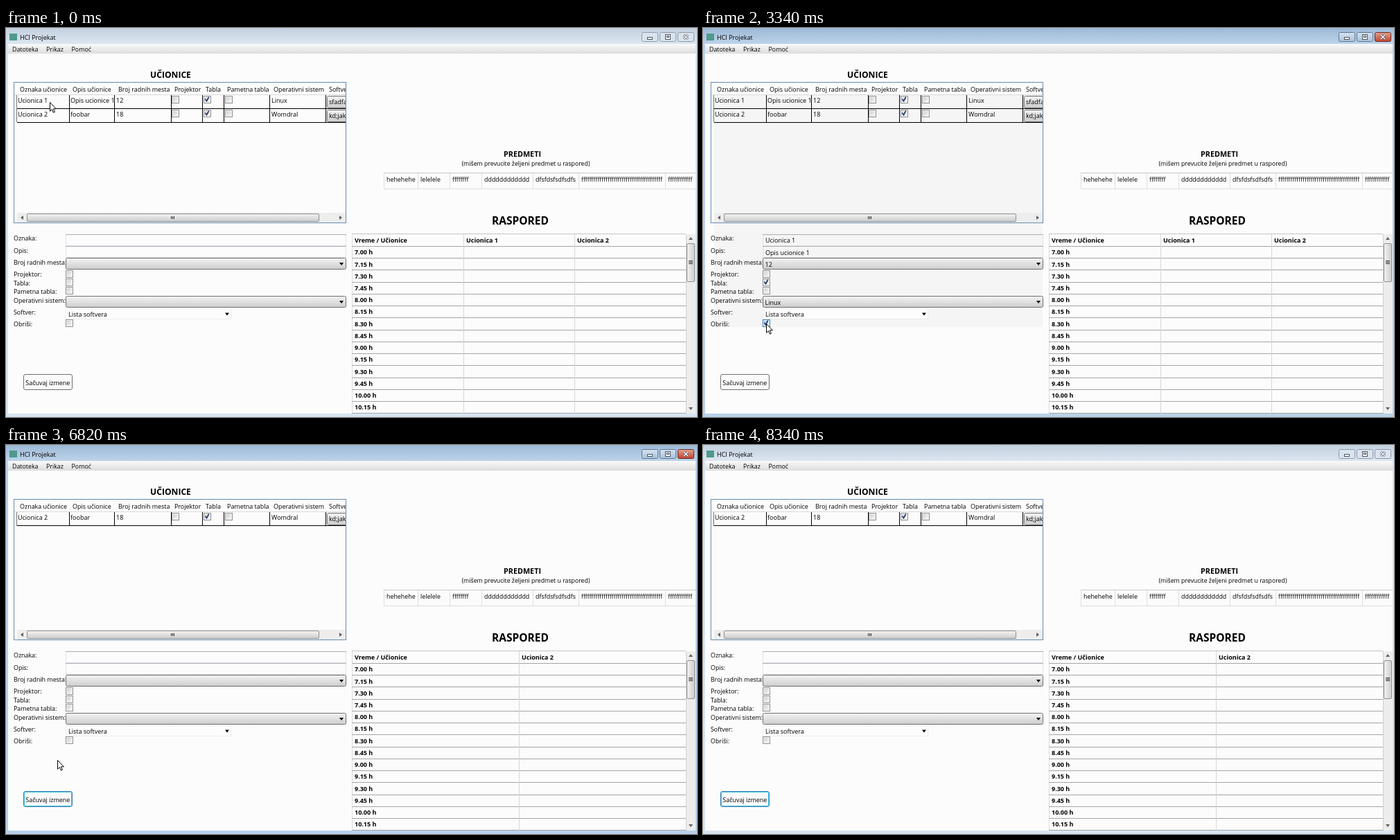
These frames come from a looping animation (997x562 px, 8440 ms). An HTML page:

```html
<!DOCTYPE html>
<html lang="sr-Latn">
<head>
<meta charset="utf-8">
<title>HCI Projekat</title>
<style>
html, body { margin: 0; width: 100%; height: 100%; overflow: hidden; background: #fcfcfc; }
svg { display: block; width: 997px; height: 562px; }
text { font-family: "Open Sans", "Noto Sans", sans-serif; font-variant-ligatures: none; white-space: pre; }
rect, line { shape-rendering: crispEdges; }
.round { shape-rendering: auto; }
</style>
</head>
<body>
<svg id="stage" viewBox="0 0 997 562" xmlns="http://www.w3.org/2000/svg"></svg>
<script>
const LOOP = 8440;
const ACTIVATE = 120, PRESS_CHECK = 2420, CHECKED = 2510, PRESS_SAVE = 4710, SAVED = 5380, DEACTIVATE = 8340;

// Drawing helpers
const box = (x, y, w, h, fill) => `<rect x="${x}" y="${y}" width="${w}" height="${h}" fill="${fill}"/>`;
const frame = (x, y, w, h, stroke, fill = 'none', r = 0, width = 1) =>
  `<rect ${r ? 'class="round"' : ''} x="${x + .5}" y="${y + .5}" width="${w - 1}" height="${h - 1}" rx="${r}" fill="${fill}" stroke="${stroke}" stroke-width="${width}"/>`;
const hline = (x1, x2, y, color) => box(x1, Math.round(y), x2 - x1, 1, color);
const vline = (x, y1, y2, color) => box(x, y1, 1, y2 - y1, color);
const label = (x, y, str, { size = 9, fill = '#000', bold = false, mid = false } = {}) =>
  `<text x="${x}" y="${y}" font-size="${size}" fill="${fill}"${bold ? ' font-weight="700"' : ''}${mid ? ' text-anchor="middle"' : ''}>${str}</text>`;
const path = (d, fill = '#000', extra = '') => `<path d="${d}" fill="${fill}" ${extra}/>`;
const during = (from, to, body) => `<g data-from="${from}" data-to="${to}">${body}</g>`;
const gradient = (id, a, b, x2 = 0, y2 = 1) =>
  `<linearGradient id="${id}" x1="0" y1="0" x2="${x2}" y2="${y2}"><stop stop-color="${a}"/><stop offset="1" stop-color="${b}"/></linearGradient>`;
const tick = (x, y) =>
  path(`M${x + 2.3} ${y + 4.6}l2.2 3 3.2-6`, 'none', 'stroke="#1d2b60" stroke-width="1.6"');
const checkbox = (x, y, on, hot) =>
  frame(x, y, 11, 11, hot ? '#3c7fb1' : '#8e8f8f', '#f4f4f4') +
  box(x + 2, y + 2, 7, 7, hot ? 'url(#hotCheck)' : 'url(#check)') + (on ? tick(x, y) : '');
const arrow = (x, y, dx, dy, color = '#000') => dx
  ? path(`M${x + 2 * dx} ${y}l${-4 * dx}-3v6z`, color)
  : path(`M${x} ${y + 2 * dy}l-3 ${-4 * dy}h6z`, color);

function titleBar(active) {
  const edge = active ? '#b9d1ea' : '#d7e4f2';
  const line = active ? '#61778f' : '#8d9aa8';
  const face = active ? 'url(#capOn)' : '#d9e4ef';
  const buttons = [917, 943, 969].map((x, i) =>
    frame(x, 6, 24, 14, active && i === 2 ? '#6b2a24' : line, active && i === 2 ? 'url(#capClose)' : face, 2)).join('');
  const glyph = 'stroke="#4a5560" stroke-width="1"';
  return box(0, 0, 997, 562, edge) + box(0, 0, 997, 23, active ? 'url(#barOn)' : 'url(#barOff)') +
    buttons + frame(925, 13, 8, 4, '#4a5560', '#fff') +
    frame(951, 9, 8, 8, '#4a5560', '#fff') + frame(953, 11, 4, 3, '#4a5560') +
    path('M978 10l6 6m0-6l-6 6', 'none', 'stroke="#4a5560" stroke-width="3"') +
    path('M978 10l6 6m0-6l-6 6', 'none', 'stroke="#fff" stroke-width="1.4"');
}

function tableRow(y, { name, about, seats, system, software }, selected) {
  const opt = { fill: selected ? '#fff' : '#000' };
  const columns = [92, 157, 239, 284, 315, 381, 462];
  return (selected ? box(16, y, 446, 19, '#3399ff') : '') +
    label(17, y + 11, name, opt) + label(93, y + 11, about, opt) +
    label(159, y + 11, seats, opt) + label(383, y + 11, system, opt) +
    columns.map(x => vline(x - 1, y, y + 20, '#000')).join('') + hline(16, 490, y + 19, '#000') +
    (selected ? frame(16, y, 76, 20, '#000') : '') +
    checkbox(239, y + 1, false) + checkbox(285, y + 1, true) + checkbox(316, y + 1, false) +
    frame(463, y + 1, 40, 18, '#707070', 'url(#face)', 2) + label(466, y + 13, software);
}

const combo = y => frame(86, y, 405, 17, '#707070', 'url(#face)', 2) + arrow(484, y + 9, 0, 1);

function schedule(rooms) {
  const width = 482 / (rooms.length + 1);
  let out = '';
  rooms.forEach((room, i) => {
    const x = Math.round(499 + width * (i + 1));
    out += vline(x, 298, 557, '#d3d6da') + label(x + 4, 310, room, { bold: true });
  });
  return out;
}

function scheduleRows() {
  let out = hline(499, 981, 297, '#c4c4c4') + vline(499, 298, 557, '#dcdcdc') + vline(981, 298, 557, '#cfcfcf') +
    label(503, 310, 'Vreme / Učionice', { bold: true });
  for (let i = 0; i < 14; i++) {
    const time = `${7 + (i >> 2)}.${String(i % 4 * 15).padStart(2, '0')} h`;
    out += hline(499, 981, 315 + i * 17.23, '#a5a5a5') +
      label(503, 327.3 + i * 17.23, time, { bold: true });
  }
  return out + hline(499, 981, 556, '#a5a5a5');
}

function subjects() {
  const cells = [[545, 'hehehehe'], [594, 'lelelele'], [640, 'f'.repeat(8)], [686, 'd'.repeat(12)],
    [760, 'dfsfdsfsdfsdfs'], [826, 'f'.repeat(40)], [951, 'f'.repeat(12)]];
  return hline(545, 995, 209, '#c8c8c8') + hline(545, 995, 232, '#dedede') +
    cells.map(([x, s]) => vline(x, 210, 233, '#dedede') +
      label(x + 4, 222, s, { size: s[0] === 'f' ? 8.65 : 8.9 })).join('');
}

function saveButton(border, fill, focused) {
  return frame(25, 500, 71, 23, border, fill, 2.5) +
    (focused ? frame(26, 501, 69, 21, '#45c3e8', 'none', 1.5) : '') +
    label(28.3, 515.5, 'Sačuvaj izmene', { size: 8.95 });
}

const roomOne = { name: 'Ucionica 1', about: 'Opis ucionice 1', seats: '12', system: 'Linux', software: 'sfadfa' };
const roomTwo = { name: 'Ucionica 2', about: 'foobar', seats: '18', system: 'Womdral', software: 'kd;jak' };

const headers = [[20, 'Oznaka učionice'], [96, 'Opis učionice'], [162, 'Broj radnih mesta'], [243, 'Projektor'],
  [288, 'Tabla'], [319, 'Pametna tabla'], [386, 'Operativni sistem'], [466, 'Softver']];
const fields = [[307, 'Oznaka:'], [325, 'Opis:'], [342, 'Broj radnih mesta:'], [359, 'Projektor:'], [372, 'Tabla:'],
  [384, 'Pametna tabla:'], [397, 'Operativni sistem:'], [414, 'Softver:'], [431, 'Obriši:']];

const defs = `<defs>
  ${gradient('barOn', '#9db9d6', '#bdd3ea')}${gradient('barOff', '#c3d0de', '#dce6f1')}
  ${gradient('capOn', '#d6e3f1', '#a9c1db')}${gradient('capClose', '#e5a193', '#c0432c')}
  ${gradient('menu', '#fafafa', '#dcdcdc')}${gradient('face', '#f3f3f3', '#cdcdcd')}
  ${gradient('thumbV', '#f3f3f3', '#cdcdcd', 1, 0)}
  ${gradient('check', '#cbcfd5', '#f7f7f7', 1, 1)}${gradient('hotCheck', '#8ecbf0', '#e6f5fd', 1, 1)}
  ${gradient('hot', '#e8f5fc', '#a8daf4')}${gradient('pressed', '#d5edf9', '#8dcbea')}
  <clipPath id="gridClip"><rect x="12" y="79" width="478.5" height="202"/></clipPath></defs>`;

const windowFrame =
  titleBar(false) + during(ACTIVATE, DEACTIVATE, titleBar(true)) +
  box(5, 8, 11, 10, '#4f9a8c') + label(20, 16.5, 'HCI Projekat') +
  box(3, 23, 992, 534, '#fcfcfc') + box(3, 23, 992, 14, 'url(#menu)') +
  label(9, 33.5, 'Datoteka', { size: 8.85 }) + label(58, 33.5, 'Prikaz', { size: 8.85 }) + label(94.5, 33.5, 'Pomoć', { size: 8.85 });

const shades =
  during(1600, PRESS_CHECK, box(64, 137, 12, 43, '#f0f0f0')) +
  during(1770, PRESS_CHECK, box(67, 180, 9, 56, '#f0f0f0')) +
  during(1910, PRESS_CHECK, box(70, 236, 12, 31, '#f0f0f0')) +
  during(PRESS_CHECK, SAVED, box(16, 97, 474, 335, '#f5f5f5')) +
  during(3440, SAVED, box(75, 422, 28, 10, '#fefefe')) +
  during(6970, DEACTIVATE, box(86, 250, 404, 17, '#f0f0f0')) +
  during(7020, DEACTIVATE, box(143, 222, 39, 28, '#f0f0f0'));

const rooms =
  label(237.5, 72.3, 'UČIONICE', { size: 12.1, bold: true, mid: true }) +
  `<g clip-path="url(#gridClip)">` +
  headers.map(([x, s]) => label(x, 92, s, { size: 8.95 })).join('') +
  hline(12, 490, 96, '#d9d9d9') + vline(15, 97, 136, '#777') +
  during(0, ACTIVATE, tableRow(97, roomOne)) +
  during(ACTIVATE, PRESS_CHECK, tableRow(97, roomOne, true)) +
  during(PRESS_CHECK, SAVED, tableRow(97, roomOne)) +
  during(0, SAVED, tableRow(117, roomTwo)) +
  during(SAVED, LOOP, box(15, 117, 1, 20, '#fcfcfc') + tableRow(97, roomTwo)) +
  box(16, 267, 475, 14, '#ededed') + frame(30, 268, 422, 12, '#8f8f8f', 'url(#face)', 1.5) +
  [238, 240, 242].map(x => vline(x, 272, 276, '#333')).join('') +
  arrow(23, 274, -1, 0, '#606060') + arrow(483, 274, 1, 0, '#606060') + '</g>' +
  frame(11, 78, 480, 204, '#688caf');

const form =
  fields.map(([y, s]) => label(11, y, s, { size: 8.9 })).join('') +
  [298, 315].map(y => frame(86, y, 405, 17, '#e2e3ea') + hline(86, 491, y, '#abadb3')).join('') +
  hline(86, 491, 331, '#d5d7dd') + combo(332) + combo(387) +
  frame(86, 405, 239, 16, '#ececec', '#fdfdfd') + label(90, 416.5, 'Lista softvera') + arrow(319, 413.5, 0, 1) +
  [350, 362, 374, 421].map(y => checkbox(86, y)).join('') +
  during(ACTIVATE, SAVED,
    label(90, 310, roomOne.name) + label(90, 327.5, roomOne.about) + label(89.5, 344.5, roomOne.seats) +
    label(89.5, 399.5, roomOne.system) + tick(86, 362)) +
  during(2270, 3440, checkbox(86, 421, false, true)) +
  during(CHECKED, SAVED, tick(86, 421)) +
  during(0, 3660, saveButton('#707070', '#fafafa')) +
  during(3660, PRESS_SAVE, saveButton('#3c7fb1', 'url(#hot)')) +
  during(PRESS_SAVE, SAVED, saveButton('#2c628b', 'url(#pressed)')) +
  during(SAVED, 6813, saveButton('#3c7fb1', 'url(#hot)', true)) +
  during(6813, LOOP, saveButton('#3c7fb1', '#fafafa', true));

const timetable =
  label(745, 186, 'PREDMETI', { size: 10.8, bold: true, mid: true }) +
  label(750, 198.5, '(mišem prevucite željeni predmet u raspored)', { size: 8.75, mid: true }) +
  subjects() +
  label(742, 283.5, 'RASPORED', { size: 15.5, bold: true, mid: true }) +
  scheduleRows() +
  during(0, SAVED, schedule([roomOne.name, roomTwo.name])) +
  during(SAVED, LOOP, schedule([roomTwo.name])) +
  box(982, 298, 13, 259, '#ededed') + frame(982, 311, 12, 56, '#8f8f8f', 'url(#thumbV)', 1.5) +
  [336, 338, 340].map(y => hline(985, 991, y, '#333')).join('') +
  arrow(988, 304, 0, -1, '#606060') + arrow(988, 550, 0, 1, '#606060');

const cursorShape = path('M.5 .5v12.7l2.9-2.7 2 4.7 2-.9-2-4.5h4z', '#fff', 'id="cursor" stroke="#000" stroke-width="1"');

const stage = document.getElementById('stage');
stage.innerHTML = defs + windowFrame + shades + rooms + form + timetable + cursorShape;

// Mouse moves advance in even steps through evenly timed points
const moves = [
  { start: 0, end: 0, steps: 1, points: [[63, 107]] },
  { start: 1490, end: 2330, steps: 16, points: [[64, 108], [65, 130], [67, 185], [71, 240], [79, 335], [88, 410], [91, 429]] },
  { start: 3340, end: 3770, steps: 10, points: [[91, 427], [90, 430], [85, 450], [73, 485], [61, 507], [57, 511]] },
  { start: 6760, end: 7560, steps: 16, points: [[60, 505], [95, 380], [173, 222], [320, 206], [540, 250], [740, 370], [850, 470]] },
  { start: 7620, end: 7620, steps: 1, points: [[856, 537]] }
];

function cursorAt(t) {
  const { start, end, steps, points } = moves.filter(m => t >= m.start).pop();
  if (t >= end) return points[points.length - 1];
  const step = Math.floor((t - start) / (end - start) * (steps - 1));
  const p = step / (steps - 1) * (points.length - 1), i = Math.floor(p);
  return points[i].map((v, k) => Math.round(v + (points[i + 1][k] - v) * (p - i)));
}

const timed = [...stage.querySelectorAll('[data-from]')].map(el => ({ el, from: +el.dataset.from, to: +el.dataset.to }));
const cursor = document.getElementById('cursor');
const origin = performance.now();

function render(now) {
  const t = Math.max(0, now - origin) % LOOP;
  for (const { el, from, to } of timed) el.style.display = t >= from && t < to ? '' : 'none';
  cursor.style.display = t < 7680 ? '' : 'none';
  cursor.setAttribute('transform', `translate(${cursorAt(t)})`);
  requestAnimationFrame(render);
}
render(origin);
</script>
</body>
</html>
```
